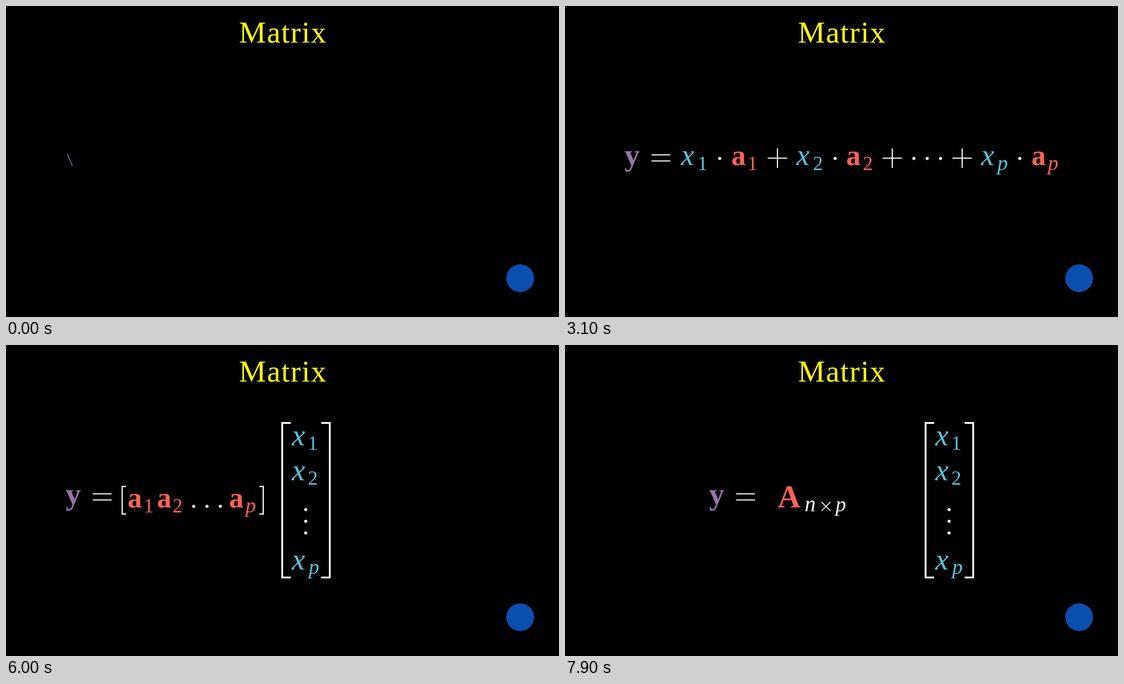
Animation, 997 px wide and 561 px high, one loop 8000 ms. Source, as an HTML page:

```html
<!DOCTYPE html>
<html lang="en">
<head>
<meta charset="utf-8">
<title>Matrix</title>
<style>
  html, body { margin: 0; width: 100%; height: 100%; overflow: hidden; background: #000; }
  svg { display: block; width: 997px; height: 561px; }
  text { font-family: "Liberation Serif", "Times New Roman", serif; }
  #eq text { text-anchor: middle; }
  #eq > * { stroke-width: 1.4; }
  .b { font-weight: bold; }
  .i { font-style: italic; }
</style>
</head>
<body>
<svg viewBox="0 0 997 561">
  <text x="420" y="66" font-size="55" letter-spacing="1.5" fill="#ff0">Matrix</text>
  <g id="eq"></g>
  <circle cx="927" cy="491" r="25" fill="#0b4fae"/>
</svg>
<script>
const LOOP = 8000, STEP = 100, SHIFT = 152.5;
const PURPLE = '#9a72ac', BLUE = '#58c4dd', RED = '#fc6255', WHITE = '#fff';
const eq = document.getElementById('eq');

function add(tag, attrs, content = '') {
  const el = document.createElementNS('http://www.w3.org/2000/svg', tag);
  for (const k in attrs) el.setAttribute(k, attrs[k]);
  el.textContent = content;
  eq.append(el);
  return el;
}

// Every glyph hangs on a baseline point; len is the outline length used while writing.
const letter = (ch, x, y, color, size, cls = '') => ({
  x, y, len: size * 3.6,
  el: add('text', { fill: color, stroke: color, 'font-size': size, class: cls }, ch)
});
const shape = (d, x, y, len = 100) => ({
  x, y, len, el: add('path', { d, fill: WHITE, stroke: WHITE })
});

const varX = (x, y = 287) => letter('x', x, y, BLUE, 54, 'i');
const vecA = (x, y = 287) => letter('a', x, y, RED, 52, 'b');
const sub = (ch, x, y, color) =>
  letter(ch, x, y, color, ch === 'p' ? 38 : 36, ch === 'p' ? 'i' : '');
const dot = (x, y = 287, dy = -12) =>
  shape(`M-2.8 ${dy}a2.8 2.8 0 1 1 5.6 0a2.8 2.8 0 1 1 -5.6 0z`, x, y, 18);
const plus = x =>
  shape('M-17.5 -13.5h16.5v-16.5h2v16.5h16.5v2h-16.5v16.5h-2v-16.5h-16.5z', x, 287, 140);
const equals = x => shape('M-17 -19.5h34v2h-34zM-17 -8.5h34v2h-34z', x, 287, 72);
const times = x =>
  shape('M-8.7 -17.3l1.2 -1.2l7.5 7.5l7.5 -7.5l1.2 1.2l-7.5 7.5l7.5 7.5l-1.2 1.2l-7.5 -7.5l-7.5 7.5l-1.2 -1.2l7.5 -7.5z', x, 301);

// Square bracket with its spine at x; a negative w opens to the left.
function bracket(x, y, w, top, bottom, t) {
  const s = Math.sign(w) * t;
  return shape(`M${w} ${top}H0V${bottom}H${w}v${-t}H${s}V${top + t}H${w}z`, x, y);
}

const left = [letter('y', 121, 287, PURPLE, 55, 'b'), equals(173)];
const sum = [
  varX(221), sub('1', 248, 296, BLUE), dot(279), vecA(313), sub('1', 338, 296, RED), plus(383),
  varX(429), sub('2', 456, 296, BLUE), dot(487), vecA(520), sub('2', 546, 296, RED), plus(590),
  dot(629), dot(653), dot(677), plus(716),
  varX(762), sub('p', 789, 296, BLUE), dot(820), vecA(854), sub('p', 880, 296, RED)
];
const row = [
  bracket(208, 293, 8, -39, 13, 2.2),
  vecA(232, 293), sub('1', 257, 302, RED), vecA(285, 293), sub('2', 309, 302, RED),
  ...[338, 362, 386].map(x => dot(x, 293, -2)),
  vecA(415, 293), sub('p', 441, 302, RED),
  bracket(464.5, 293, -8, -39, 13, 2.2)
];
const column = [
  bracket(496, 280, 17, -141, 141, 3.2),
  varX(527, 181), sub('1', 553, 189, BLUE),
  varX(527, 244), sub('2', 553, 252, BLUE),
  ...[297, 318, 339].map(y => dot(540, y + 12)),
  varX(527, 405), sub('p', 555, 413, BLUE),
  bracket(585, 280, -17, -141, 141, 3.2)
];
const product = [
  letter('A', 251.5, 293, RED, 57, 'b'),
  letter('n', 289, 300, WHITE, 40, 'i'), times(317.5), letter('p', 344, 300, WHITE, 38, 'i')
];
const matrix = [...row, ...column];
column.forEach(g => g.small = 0.2);

// Which glyph of the earlier line each new glyph grows out of.
const matrixFrom = [0, 3, 4, 5, 6, 7, 8, 8, 10, 12, 15, ...column.map(() => 18)];
const productFrom = [2, 5, 7, 9];

const clamp = v => Math.max(0, Math.min(1, v));
const mix = (a, b, p) => a + (b - a) * p;
const sigmoid = v => 1 / (1 + Math.exp(-v));
function smooth(v) {
  const e = sigmoid(-5);
  return clamp((sigmoid(10 * (clamp(v) - 0.5)) - e) / (1 - 2 * e));
}

function place(g, x, y, scale, opacity) {
  g.el.setAttribute('transform', `translate(${x} ${y}) scale(${scale})`);
  g.el.setAttribute('opacity', opacity);
}

// Outline first, then fill.
function write(g, p) {
  place(g, g.x, g.y, 1, p > 0 ? 1 : 0);
  const drawn = clamp(p * 2), filled = clamp(p * 2 - 1);
  g.el.setAttribute('stroke-dasharray', drawn < 1 ? `${drawn * g.len} ${g.len * 2}` : 'none');
  g.el.setAttribute('stroke-opacity', 1 - filled);
  g.el.setAttribute('fill-opacity', filled);
}

function morph(olds, news, from, p) {
  const shown = clamp((p - 0.3) / 0.4);
  news.forEach((g, i) => {
    const o = olds[from[i]];
    place(g, mix(o.x, g.x, p), mix(o.y, g.y, p), mix(g.small || 0.75, 1, p), shown);
  });
  olds.forEach((g, i) => {
    const n = news[from.findIndex(f => f >= i)] || news[news.length - 1];
    place(g, mix(g.x, n.x, p), mix(g.y, n.y, p), mix(1, 0.75, p), 1 - shown);
  });
}

[...matrix, ...product].forEach(g => {
  g.el.setAttribute('stroke', 'none');
  place(g, g.x, g.y, 1, 0);
});

function draw(t) {
  const line = [...left, ...sum], lag = 4 / (line.length + 1);
  const pen = (t + 25) / 2000 * (1 + (line.length - 1) * lag);
  line.forEach((g, i) => write(g, clamp(pen - i * lag)));

  const toMatrix = smooth((t - 3975) / 1000);
  const toProduct = smooth((t - 6975) / 1000);
  if (toMatrix > 0) morph(sum, matrix, matrixFrom, toMatrix);
  else matrix.forEach(g => place(g, g.x, g.y, 1, 0));
  if (toProduct > 0) morph(row, product, productFrom, toProduct);
  else product.forEach(g => place(g, g.x, g.y, 1, 0));

  eq.setAttribute('transform', `translate(${SHIFT * smooth((t - 5970) / 1000)} 0)`);
}

const start = performance.now();
function tick() {
  const t = (performance.now() - start) % LOOP;
  draw(Math.floor(t / STEP) * STEP);
  requestAnimationFrame(tick);
}
tick();
</script>
</body>
</html>
```
